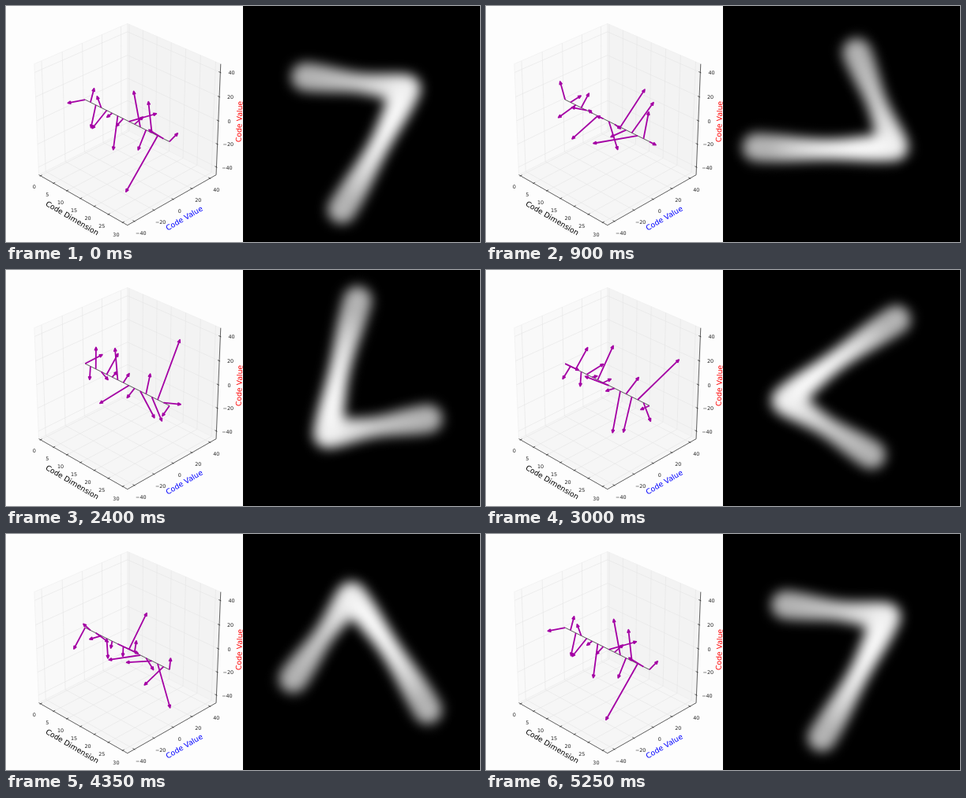
An HTML page that plays this animation: 600x300 px, repeating every 5.4 s.

```html
<!DOCTYPE html>
<html>
<head>
<meta charset="utf-8">
<style>
  html, body { margin: 0; width: 100%; height: 100%; overflow: hidden; background: #fdfdfd; }
  svg { display: block; }
  text { font: 6.4px "DejaVu Sans", sans-serif; text-anchor: middle; dominant-baseline: central; fill: #222; }
  .title { font-size: 9.3px; }
  path { fill: none; }
  .arrow { fill: #a400a4; stroke: #a400a4; stroke-width: 1.8px; stroke-linejoin: round; }
</style>
</head>
<body>
<svg width="600" height="300" viewBox="0 0 600 300">
  <defs>
    <filter id="soft" filterUnits="userSpaceOnUse" x="-200" y="-200" width="400" height="400" color-interpolation-filters="sRGB">
      <feGaussianBlur stdDeviation="7.5"/>
    </filter>
    <clipPath id="right"><rect x="300" width="300" height="300"/></clipPath>
  </defs>
  <g id="plot"></g>
  <rect x="300" width="300" height="300" fill="#000"/>
  <g clip-path="url(#right)"><g id="digit"><g id="ink" filter="url(#soft)"></g></g></g>
</svg>
<script>
const STEP = 150, FRAMES = 36, TURN = 2 * Math.PI / (FRAMES - 1);
const RAD = Math.PI / 180, H = 0.5, UNIT = 0.48 / 45;
const [plot, digit, ink] = ['plot', 'digit', 'ink'].map(id => document.getElementById(id));

// Length and starting angle of each code vector
const vectors = [
  [18.5, 167], [11.5, 69], [18.7, 253], [12.5, 110], [18, 212], [6, 193], [28, 260], [8.5, 205],
  [30, -10], [9.5, 17], [33.5, 102], [16, 239], [28, 98], [46.5, 226], [21, 138], [9.5, 22]
];

function add(parent, tag, attrs, text) {
  const el = document.createElementNS('http://www.w3.org/2000/svg', tag);
  for (const k in attrs) el.setAttribute(k, attrs[k]);
  if (text !== undefined) el.textContent = text;
  return parent.appendChild(el);
}

// Perspective view of a unit cube, elevation 30, azimuth -45
function project(x, y, z) {
  const c = Math.cos(30 * RAD), q = Math.SQRT1_2;
  const scale = 1627 / (10 - (c * (x - y) * q + z / 2));
  return [153.8 + scale * (x + y) * q, 145.9 - scale * ((y - x) * q / 2 + c * z)];
}
const dim = d => -0.48 + 0.96 * d / 31;
const pathOf = pts => 'M' + pts.map(p => project(...p)).join('L');
const line = (color, width, ...pts) => add(plot, 'path', { d: pathOf(pts), stroke: color, 'stroke-width': width });
const pane = (color, ...pts) =>
  add(plot, 'path', { d: pathOf(pts) + 'Z', style: 'fill:' + color, stroke: '#ececec', 'stroke-width': 0.6 });

function drawAxes() {
  pane('#f9f9f9', [-H, -H, -H], [-H, H, -H], [-H, H, H], [-H, -H, H]);
  pane('#f3f3f3', [-H, H, -H], [H, H, -H], [H, H, H], [-H, H, H]);
  pane('#f6f6f6', [-H, -H, -H], [H, -H, -H], [H, H, -H], [-H, H, -H]);

  const grid = (...pts) => line('#e4e4e4', 0.6, ...pts);
  const tick = (a, b) => line('#222', 0.7, a, b);
  const label = (n, ...at) => {
    const [x, y] = project(...at);
    add(plot, 'text', { x, y: y + 0.8 }, String(n).replace('-', '\u2212'));
  };
  const near = H - 0.017, far = H + 0.008, off = H + 0.07, side = H + 0.06;

  for (let n = 0; n <= 30; n += 5) {
    const d = dim(n);
    grid([d, -H, -H], [d, H, -H], [d, H, H]);
    tick([d, -near, -H], [d, -far, -H]);
    label(n, d, -off, -off);
  }
  for (let n = -40; n <= 40; n += 20) {
    const v = n * UNIT;
    grid([H, v, -H], [-H, v, -H], [-H, v, H]);
    grid([-H, -H, v], [-H, H, v], [H, H, v]);
    tick([near, v, -H], [far, v, -H]);
    tick([near, H, v], [far, H, v]);
    label(n, off, v, -off);
    label(n, side, side, v);
  }
  line('#222', 0.7, [-H, -H, -H], [H, -H, -H], [H, H, -H], [H, H, H]);

  const title = (x, y, angle, fill, text) =>
    add(plot, 'text', { class: 'title', transform: `translate(${x} ${y}) rotate(${angle})`, style: 'fill:' + fill }, text);
  title(84, 269.5, 30.5, '#000', 'Code Dimension');
  title(225.5, 269.5, -30.5, '#00f', 'Code Value');
  title(295, 147, -88, '#f00', 'Code Value');

  line('#444', 0.9, [dim(0), 0, 0], [dim(30), 0, 0]);
}

function arrow(base, tip) {
  const dx = tip[0] - base[0], dy = tip[1] - base[1], len = Math.hypot(dx, dy) || 1;
  const at = (back, side) =>
    [tip[0] - (dx * back - dy * side) / len, tip[1] - (dy * back + dx * side) / len];
  return `M${base}L${at(3, 0)}M${at(0.8, 0)}L${at(4, 1.4)}L${at(4, -1.4)}Z`;
}

// Two curved strokes that swell at their ends and are brightest past the corner
function drawDigit() {
  const tip = [-71, -60], corner = [57, -45], foot = [-27, 112];
  const strokes = [[tip, [0, -52], corner], [corner, [27, 25], foot]];
  const split = 0.42;
  strokes.forEach(([a, b, c], i) => {
    for (let t = 0; t <= 1; t += 0.02) {
      const [cx, cy] = a.map((v, k) => (1 - t) ** 2 * v + 2 * t * (1 - t) * b[k] + t * t * c[k]);
      const along = i ? split + (1 - split) * t : split * t;
      const g = Math.round(175 + 75 * Math.sin(Math.PI * along ** 1.5));
      const r = 13 + 5 * Math.cos(Math.PI * t) ** 2;
      add(ink, 'circle', { cx, cy, r, fill: `rgb(${g},${g},${g})` });
    }
  });
}

drawAxes();
drawDigit();
const arrows = vectors.map(() => add(plot, 'path', { class: 'arrow' }));

function draw(now) {
  const turn = Math.floor(now / STEP) % FRAMES * TURN;
  vectors.forEach(([length, start], i) => {
    const x = dim(2 * i), a = start * RAD - turn, r = length * UNIT;
    arrows[i].setAttribute('d', arrow(project(x, 0, 0), project(x, r * Math.cos(a), r * Math.sin(a))));
  });
  digit.setAttribute('transform', `translate(450 150) rotate(${turn / RAD})`);
}

const begin = performance.now();
function loop() {
  draw(performance.now() - begin);
  requestAnimationFrame(loop);
}
loop();
</script>
</body>
</html>
```
